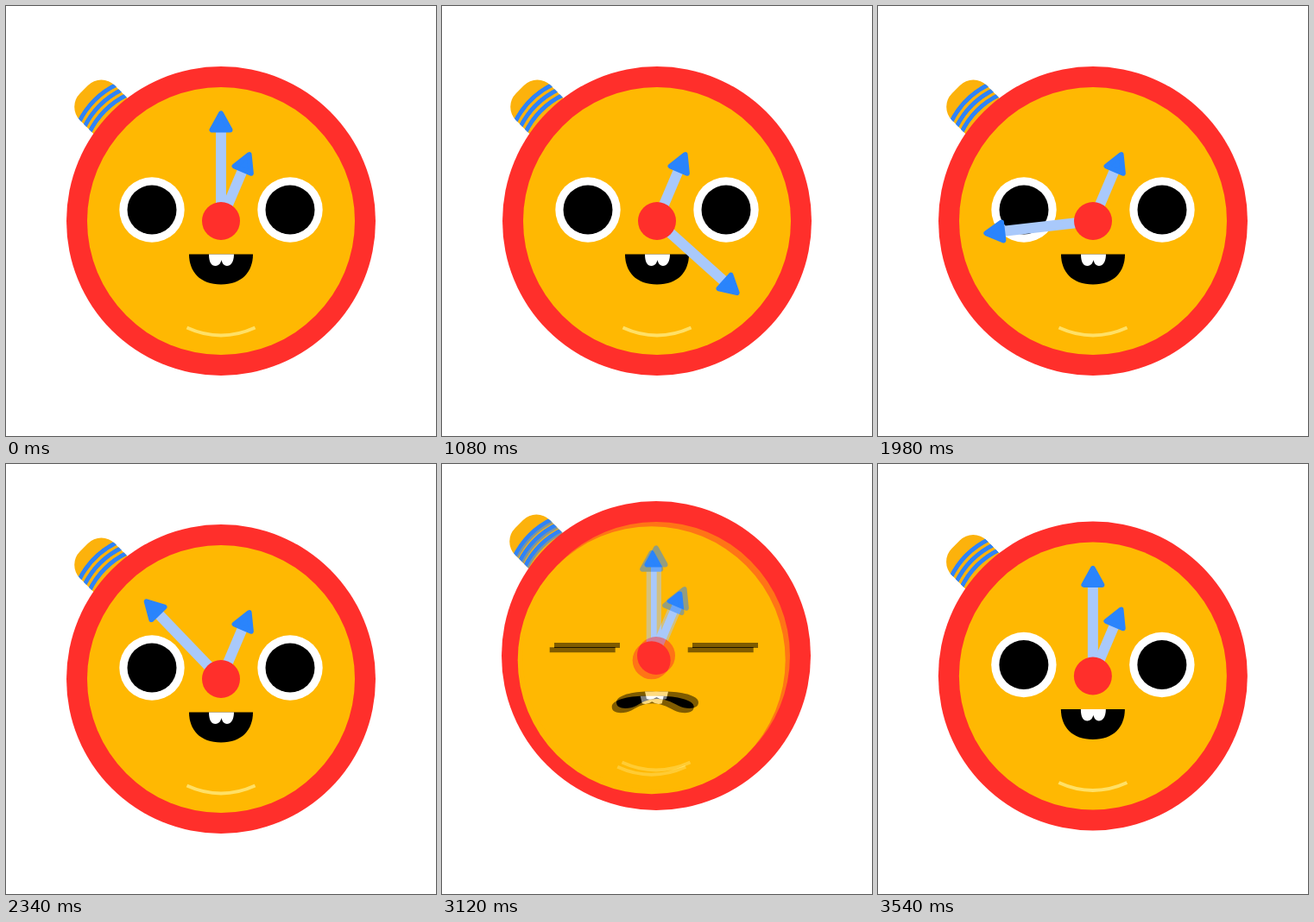
Animation of 498x498 px, one loop 3600 ms. Source, as an HTML page:

```html
<!DOCTYPE html>
<html lang="en">
<head>
<meta charset="utf-8">
<title>Alarm clock</title>
<style>
  html, body { margin: 0; width: 100%; height: 100%; overflow: hidden; background: #fff; }
  svg { display: block; width: 100vw; height: 100vh; }
</style>
</head>
<body>
<svg viewBox="0 0 498 498">
  <defs>
    <clipPath id="capClip"><rect x="-33" y="-220" width="57" height="70" rx="22"/></clipPath>

    <g id="stripes" fill="none" stroke="#2f83f7" stroke-width="4.6">
      <path d="M-36 -197Q-4.5 -208 27 -197"/>
      <path d="M-36 -188.500Q-4.500 -199.500 27 -188.500"/>
      <path d="M-36 -180Q-4.5 -191 27 -180"/>
    </g>

    <path id="arrow" d="M249 124.500L238.500 143.500H259.500Z" fill="#2a84fc"
          stroke="#2a84fc" stroke-width="6" stroke-linejoin="round"/>

    <g id="eye">
      <circle r="37.700" fill="#fff"/>
      <circle r="28.500"/>
    </g>

    <g id="face">
      <circle cx="249" cy="249" r="155" fill="#ffb802"/>
      <path d="M209.500 372.500Q249 390.500 288.500 372.500" fill="none" stroke="#ffe066" stroke-width="4"/>

      <g id="awake">
        <use href="#eye" x="169" y="236"/>
        <use href="#eye" x="329" y="236"/>
        <path d="M212 287.500H286C286 308 273 322.500 249 322.500S212 308 212 287.500Z"/>
        <path d="M235 287.500H264C264 297 260 301 256 301S250 297 249.500 294C249 297 247 301 242.500 301S235 297 235 287.500Z" fill="#fff"/>
      </g>

      <g id="ringing">
        <path d="M131 234H207V240H131ZM291 234H367V240H291Z"/>
        <path d="M249 291C268 289 298 293 298 303C298 312 283 311 275 307C266 302 259 299 250 299C241 299 234 302 226 307C218 311 203 312 203 303C203 293 231 289 249 291Z"/>
        <path d="M236 290.500H263L261 299Q255 301 249.500 297Q244 301 238 299Z" fill="#fff"/>
      </g>

      <g transform="rotate(23 249 249)">
        <path d="M249 249V186" stroke="#a9c9fb" stroke-width="12"/>
        <use href="#arrow" y="41"/>
      </g>
      <g id="minute">
        <path d="M249 249V145" stroke="#a9c9fb" stroke-width="12"/>
        <use href="#arrow"/>
      </g>
      <circle cx="249" cy="249" r="22" fill="#ff2f2b"/>
    </g>
  </defs>

  <g id="clock">
    <g transform="translate(249 249) rotate(-45)">
      <rect x="-33" y="-220" width="57" height="70" rx="22" fill="#fcb20c"/>
      <g clip-path="url(#capClip)">
        <use href="#stripes" id="stripesBack"/>
        <use href="#stripes" id="stripesFront"/>
      </g>
    </g>
    <circle cx="249" cy="249" r="179" fill="#ff2f2b"/>
    <use href="#face" id="faceBack"/>
    <use href="#face" id="faceFront" opacity=".5"/>
  </g>
</svg>
<script>
  const LOOP = 3600, STEP = 60;
  const el = id => document.getElementById(id);
  const set = (id, name, value) => el(id).setAttribute(name, value);
  const show = (id, on) => set(id, 'display', on ? 'inline' : 'none');

  // Keyframes are [time, value] pairs, eased within each segment.
  function track(keys, t) {
    if (t <= keys[0][0]) return keys[0][1];
    for (let i = 1; i < keys.length; i++) {
      const [t0, a] = keys[i - 1], [t1, b] = keys[i];
      if (t < t1) {
        const p = (t - t0) / (t1 - t0);
        return a + (b - a) * p * p * (3 - 2 * p);
      }
    }
    return keys[keys.length - 1][1];
  }

  const scaleX = [[2580, 1], [2700, 1.039], [2760, 1.022], [2880, 1]];
  const scaleY = [[2580, 1], [2700, .927], [2760, .958], [2880, 1]];
  const jump = [[2760, 0], [2940, -27], [3300, -27], [3610, 0]];
  const shake = [[2640, 3], [2760, 3.6], [3000, 5.3]];

  // One turn at steady speed with a soft start and stop.
  function minuteAngle(t) {
    const start = 356, brake = 2580, stop = 2700;
    const speed = 360 / ((brake + stop) / 2 - start / 2);
    if (t < start) return speed * t * t / (2 * start);
    if (t < brake) return speed * (t - start / 2);
    const left = Math.max(0, stop - t);
    return 360 - speed * left * left / (2 * (stop - brake));
  }

  function draw(t) {
    const ringing = t >= 2640 && t < 3300;
    const y = track(jump, t);
    const offset = ringing ? track(shake, t) : 0;

    set('clock', 'transform',
      `translate(${249 + y / 27} ${249 + y}) ` +
      `scale(${track(scaleX, t)} ${track(scaleY, t)}) translate(-249 -249)`);
    set('minute', 'transform', `rotate(${minuteAngle(t)} 249 249)`);

    show('awake', !ringing);
    show('ringing', ringing);
    show('faceFront', ringing);
    set('faceBack', 'transform', `translate(${-offset} ${offset})`);
    set('stripesBack', 'transform', `translate(0 ${offset / 2})`);
    set('stripesBack', 'opacity', ringing ? .6 : 1);
  }

  const begin = performance.now();
  function tick() {
    const t = performance.now() - begin + 8;
    draw(Math.floor(t % LOOP / STEP) * STEP);
    requestAnimationFrame(tick);
  }
  tick();
</script>
</body>
</html>
```
